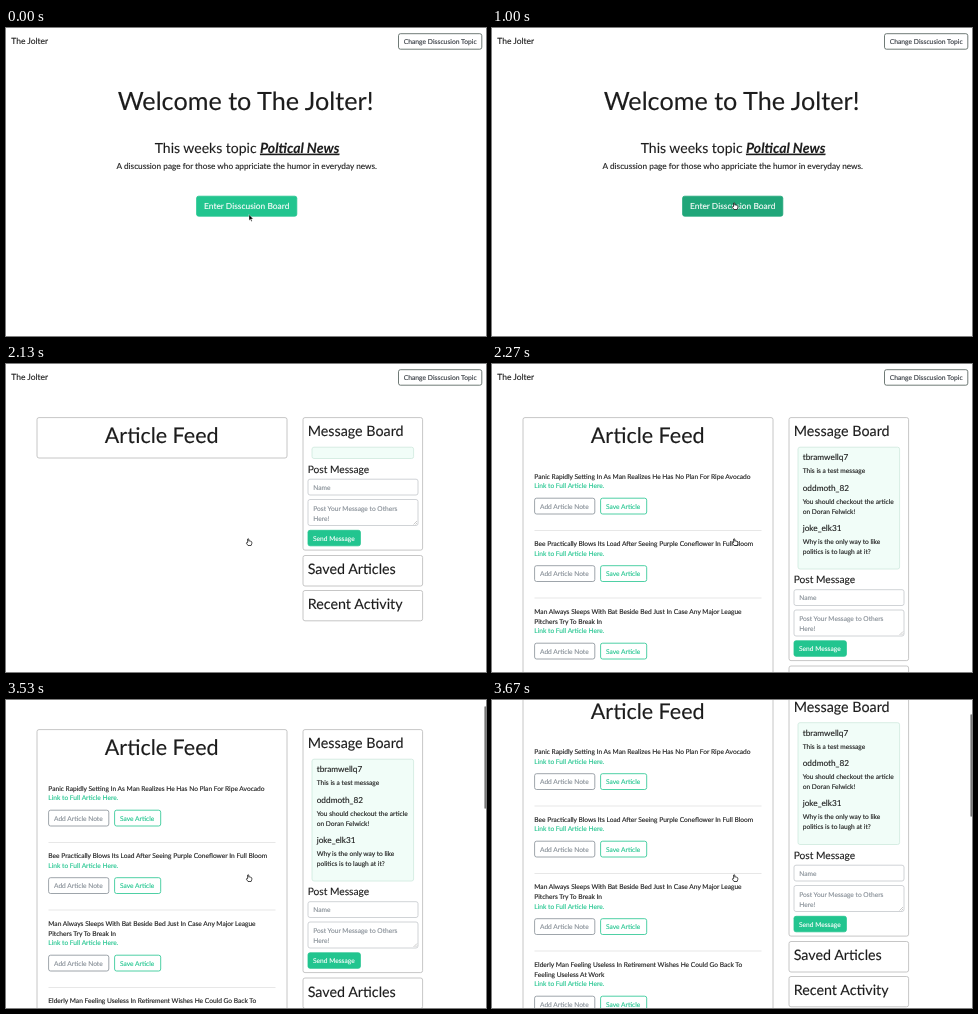
Write an HTML page that moves like this. It is 480 px wide and 308 px high and loops after 3.99 s.

```html
<!DOCTYPE html>
<html lang="en">
<head>
<meta charset="utf-8">
<title>Discussion board</title>
<style>
  html, body { margin: 0; width: 100%; height: 100%; overflow: hidden; background: #fff; }
  svg { display: block; font-family: Lato, "Open Sans", sans-serif; text-rendering: geometricPrecision; }
</style>
</head>
<body>
<svg id="stage" width="480" height="308" viewBox="0 0 480 308"></svg>
<script>
const LOOP = 3990, INK = '#1c1c1c', GREEN = '#22c58f', GREY = '#868e96', EDGE = '#b8b8b8';
const SMALL = 6.64, BODY = 8.27, HEAD = 14.3;
const stage = document.getElementById('stage');

// The hairline stroke gives the slightly heavy look of smoothed screen text.
const text = (x, y, size, str, fill = INK, extra = '') =>
  `<text x="${x}" y="${y}" font-size="${size}" fill="${fill}" stroke="${fill}" stroke-width=".12" ${extra}>${str}</text>`;
const box = (x, y, right, bottom, stroke, fill = '#fff', r = 2) =>
  `<rect x="${x}" y="${y}" width="${right - x}" height="${bottom - y}" rx="${r}" fill="${fill}" stroke="${stroke}" stroke-width=".8"/>`;
const move = (x, y, body) => `<g transform="translate(${x} ${y})">${body}</g>`;
const centered = 'text-anchor="middle"';

const nav = text(5.2, 16.4, 8.5, 'The Jolter') +
  box(392.5, 5.7, 475.8, 21.2, '#4c5a55') +
  text(434.2, 16, 6.75, 'Change Disscusion Topic', '#343a40', centered);

const arrow = move(243, 186.5,
  '<path d="M0 0V6L1.4 4.8L2.3 6.9L3.2 6.5L2.3 4.5H4.2Z" fill="#000" stroke="#fff" stroke-width=".4"/>');
const hand = y => move(243, y,
  `<path d="M-1.4 .6V-3Q-.8-3.8-.2-3V-.9Q.5-1.4 1-.7Q1.6-1.1 2-.4Q2.7-.6 2.8.2V1.6L2.1 3.5H-1L-2.6 1.2Q-2.6.2-1.4.6Z"
    fill="#fff" stroke="#000" stroke-width=".7" stroke-linejoin="round"/>`);

const home = buttonFill =>
  text(111.7, 82, 25.2, 'Welcome to The Jolter!') +
  text(148.7, 124.7, 14, 'This weeks topic') +
  text(254, 124.7, 14, 'Poltical News', INK, 'font-weight="700" font-style="italic" text-decoration="underline"') +
  text(240.8, 141, BODY, 'A discussion page for those who appriciate the humor in everyday news.', INK, centered) +
  box(190.6, 168.2, 290.8, 188.2, buttonFill, buttonFill) +
  text(240.7, 181, 8.42, 'Enter Disscusion Board', '#fff', centered);

const headlines = [
  ['Panic Rapidly Setting In As Man Realizes He Has No Plan For Ripe Avocado'],
  ['Bee Practically Blows Its Load After Seeing Purple Coneflower In Full Bloom'],
  ['Man Always Sleeps With Bat Beside Bed Just In Case Any Major League', 'Pitchers Try To Break In'],
  ['Elderly Man Feeling Useless In Retirement Wishes He Could Go Back To', 'Feeling Useless At Work']
];

function articles() {
  let y = 114.5, out = '';
  for (const lines of headlines) {
    lines.forEach((line, i) => out += text(42.3, y + i * 10, SMALL, line));
    y += (lines.length - 1) * 10;
    out += text(42.3, y + 9.8, SMALL, 'Link to Full Article Here.', GREEN) +
      box(42.6, y + 19.7, 102.8, y + 35.5, GREY) + text(48, y + 30, SMALL, 'Add Article Note', GREY) +
      box(108.6, y + 19.7, 154.7, y + 35.5, GREEN) + text(114, y + 30, SMALL, 'Save Article', GREEN) +
      `<path d="M42.5 ${y + 52}H269.5" stroke="#ddd" stroke-width=".7"/>`;
    y += 67.5;
  }
  return out;
}

const posts = [
  [96.2, 'tbramwellq7', 'This is a test message'],
  [126.5, 'oddmoth_82', 'You should checkout the article', 'on Doran Felwick!'],
  [166.8, 'joke_elk31', 'Why is the only way to like', 'politics is to laugh at it?']
];
const messages = () => posts.map(([y, user, ...lines]) =>
  text(310.7, y, BODY, user) +
  lines.map((line, i) => text(310.7, y + 13 + i * 10, SMALL, line)).join('')).join('');

const form =
  text(301.7, 219, 10.2, 'Post Message') +
  box(302, 225.7, 412, 241.5, '#c4c8cc') + text(307.3, 236, SMALL, 'Name', GREY) +
  box(302, 246, 412, 272, '#c4c8cc') +
  text(307.3, 257, SMALL, 'Post Your Message to Others', GREY) + text(307.3, 267, SMALL, 'Here!', GREY) +
  '<path d="M407.5 271L411 267.5M409.5 271L411 269.5" stroke="#999" stroke-width=".5"/>' +
  box(302, 276.8, 354.4, 292.3, GREEN, GREEN) + text(307, 287, SMALL, 'Send Message', '#fff');

const panels = box(297, 302, 416.6, 332.5, EDGE) + text(301.7, 320.8, HEAD, 'Saved Articles') +
  box(297, 337, 416.6, 367.3, EDGE) + text(301.7, 355.6, HEAD, 'Recent Activity');

// Before the data arrives the lists are empty and everything below sits higher.
function board(loaded) {
  const lift = loaded ? 0 : 110.5;
  return box(31, 53.6, 281, loaded ? 480 : 94, EDGE) +
    text(155.7, 79, 21.5, 'Article Feed', INK, centered) +
    box(297, 53.6, 416.6, 296.6 - lift, EDGE) +
    text(301.7, 72, HEAD, 'Message Board') +
    box(306, 83.2, 407.6, 205 - lift, '#cfe9de', '#f1fdf8') +
    (loaded ? articles() + messages() : '') +
    move(0, -lift, form + panels);
}

const stepAt = (t, times) => times.filter(s => t >= s).length;
const mix = (a, b, k) => `rgb(${a.map((v, i) => Math.round(v + (b[i] - v) * k))})`;

function frame(t) {
  if (t < 2130) {
    const k = Math.max(0, stepAt(t, [730, 800, 870, 930, 1000]) - 1) / 4;
    const glide = 1 - (1 - k) ** 2;
    const fill = t < 1730 ? mix([34, 197, 143], [32, 166, 121], k) : '#209b70';
    return nav + home(fill) + (t < 730 ? arrow : hand(184.5 - 6.5 * glide));
  }
  const scroll = [0, .5, 24, 51.5, 60.5][stepAt(t, [3470, 3530, 3600, 3670])];
  const bar = scroll > 1
    ? `<rect x="478.4" y="${1 + scroll * .22}" width="1.6" height="102.5" rx=".8" fill="#777"/>` : '';
  return move(0, -scroll, nav + board(t >= 2270)) + bar + hand(178);
}

const start = performance.now();
let shown = '';
function tick() {
  const next = frame((performance.now() - start) % LOOP);
  if (next !== shown) stage.innerHTML = shown = next;
  requestAnimationFrame(tick);
}
tick();
</script>
</body>
</html>
```
